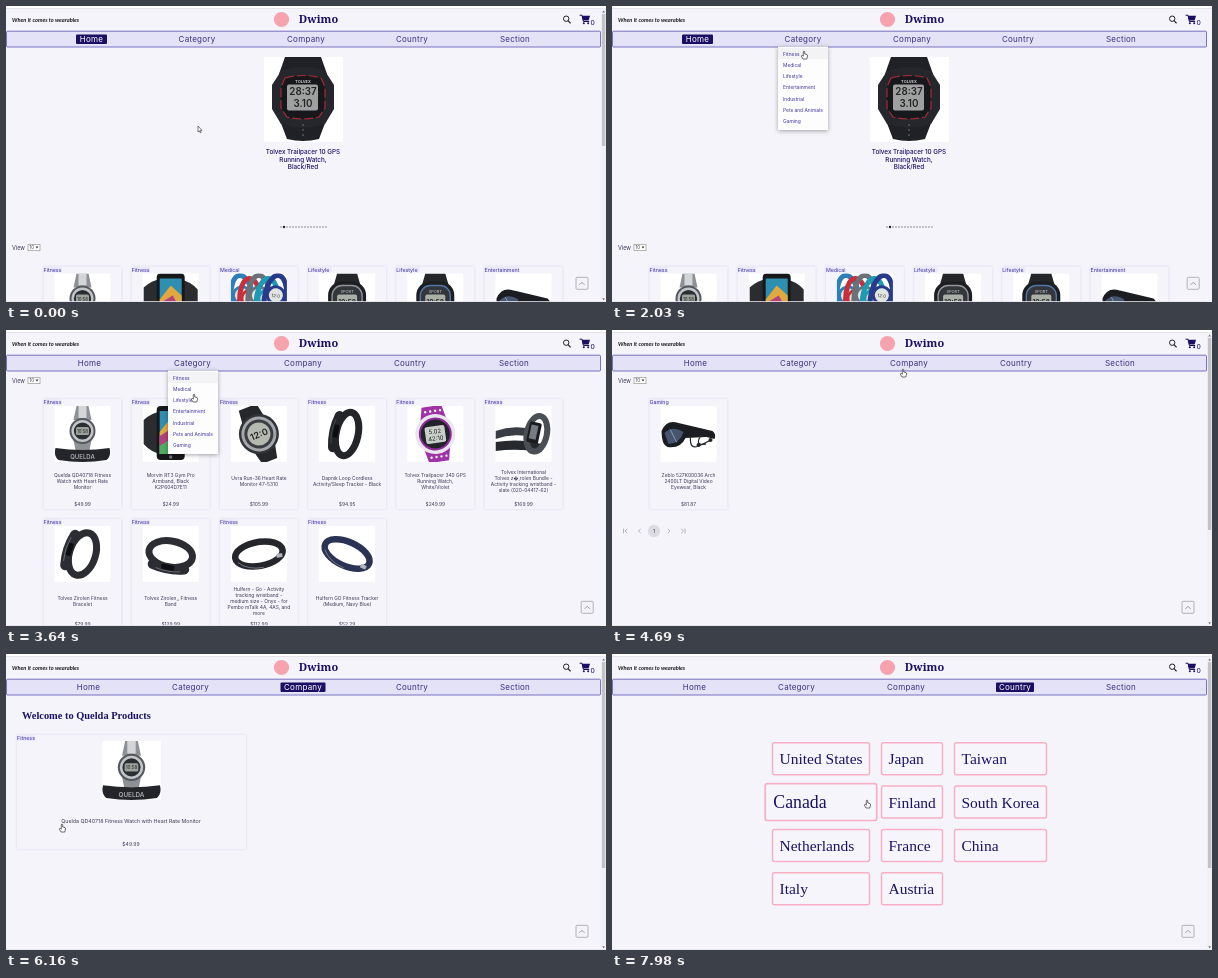
Animation of 600 by 296 pixels, one loop 8 s. Source, as an HTML page:

```html
<!DOCTYPE html>
<html lang="en">
<head>
<meta charset="utf-8">
<title>Wearables shop</title>
<style>
  html, body { margin: 0; width: 100%; height: 100%; overflow: hidden; background: #f5f4fb; }
  svg { display: block; width: 100%; height: 100%; font-family: Inter, "Open Sans", sans-serif; }
  .serif { font-family: "Liberation Serif", "Noto Serif", serif; fill: #1b1266; }
  .card { fill: #f5f4fb; filter: drop-shadow(.9px .9px 1px rgba(70, 60, 150, .17)); }
  .menu { fill: #fdfdfe; filter: drop-shadow(0 1.5px 2px rgba(0, 0, 0, .35)); }
  .mid { text-anchor: middle; }
  .box { transform-box: fill-box; transform-origin: center; }
</style>
</head>
<body>
<svg id="stage" viewBox="0 0 600 296"></svg>
<script>
const LOOP = 8000, STEP = 70;
const NAVY = '#1b0e63', INK = '#3d3a55', LINK = '#4034a6';

const rect = (x, y, w, h, fill, more = '') =>
  `<rect x="${x}" y="${y}" width="${w}" height="${h}" fill="${fill}" ${more}/>`;
const disc = (x, y, r, fill, more = '') =>
  `<circle cx="${x}" cy="${y}" r="${r}" fill="${fill}" ${more}/>`;
const ring = (x, y, rx, ry, color, w) =>
  `<ellipse cx="${x}" cy="${y}" rx="${rx}" ry="${ry}" fill="none" stroke="${color}" stroke-width="${w}"/>`;
const path = (d, fill, more = '') => `<path d="${d}" fill="${fill}" ${more}/>`;
const line = (d, color, w, more = '') =>
  path(d, 'none', `stroke="${color}" stroke-width="${w}" stroke-linecap="round" stroke-linejoin="round" ${more}`);
const text = (x, y, s, size, fill = INK, more = '') =>
  `<text x="${x}" y="${y}" font-size="${size}" fill="${fill}" ${more}>${s}</text>`;
const mid = (x, y, s, size, fill = INK, more = '') => text(x, y, s, size, fill, 'class="mid" ' + more);
const group = (inner, more = '') => `<g ${more}>${inner}</g>`;
const turn = (a, inner) => group(inner, `transform="rotate(${a} 28 28)"`);

// Product pictures, each on a 56 x 56 square
const digital = accent =>
  path('M18 0H38L42 14H14ZM14 42H42L38 56H18Z', '#25262a') +
  rect(9, 8, 38, 40, '#1d1e22', 'rx="14"') + rect(13, 12, 30, 32, '#33363b', `rx="10" stroke="${accent}" stroke-width="1.4"`) +
  mid(28, 19, 'SPORT', 4, '#c9ccd0') + rect(18, 21, 20, 13, '#a9b0a6', 'rx="2"') +
  mid(28, 30.5, '10:58', 6.5, '#24262a', 'font-weight="700"');

// Tall wristband seen at an angle, with a wide front face
const band = (tilt, rx, color, shine) => turn(tilt,
  ring(28, 28, rx, 22, color, 7) + line(`M${28 - rx} 12Q${24 - rx} 28 ${28 - rx} 44`, color, 10) +
  line(`M${25 - rx} 16Q${22 - rx} 28 ${25 - rx} 40`, shine, .8) + rect(25 - rx, 21, 5, 13, '#0d0e11', 'rx="1"'));

const bangle = (tilt, color) => turn(tilt,
  ring(28, 28, 24, 12, color, 6.5) + line('M6 33Q14 42 30 42', '#767b88', .9) + rect(45, 31, 6, 4, '#b0b3bb', 'rx="1"'));

const ART = {
  chest:
    path('M22 0H34L37 14H19ZM19 34H37L35 44H21Z', '#8d9095') + rect(24, 0, 8, 12, '#d3d5d8') +
    disc(28, 25, 13, '#54575c') + disc(28, 25, 11, '#c3c6c9') + disc(28, 25, 8.6, '#2b2e33') +
    rect(21.5, 21, 13, 8, '#9ba29c', 'rx="1.5"') + mid(28, 27, '10:58', 4.4, '#222') +
    path('M1 42Q28 46 55 42Q57 50 52 54Q28 58 4 54Q-1 50 1 42Z', '#24252a') +
    mid(28, 53, 'QUELDA', 6, '#a9abb0', 'font-weight="600"'),
  armband:
    path('M1 14Q10 6 18 6V48Q8 46 1 38ZM38 6Q48 8 55 16V38Q48 46 38 48Z', '#2b2c30') +
    rect(14, 0, 28, 54, '#17181c', 'rx="4"') + rect(17, 5, 22, 43, '#2f8fb0') +
    path('M17 26L28 12L39 22V48H17Z', '#e0a83f') + path('M17 30L30 22L39 38V48H17Z', '#b1427f') +
    path('M17 40L28 33L36 48H17Z', '#4fae62') + disc(28, 51, 1.7, '#777'),
  colours: ['#2c7fb8', '#c92f3b', '#6d7077', '#1d9bb3', '#283a8c'].map((c, i) =>
    group(ring(0, 26, 11, 24, c, 5) + disc(0, 22, 10, c) + disc(0, 22, 7, '#e2e4e0') + mid(0, 24, '12:0', 4.4, '#333'),
      `transform="translate(${8 + i * 10} ${i % 2 * 3}) rotate(${i * 4 - 8})"`)).join(''),
  grey: digital('#91959b'),
  blue: digital('#5076a6'),
  round: turn(-22,
    path('M18 -1H37L40 16H16ZM16 40H40L36 57H20Z', '#25272a') + disc(28, 28, 20, '#303338') +
    disc(28, 28, 17.5, '#a4a8aa') + disc(28, 28, 14.5, '#3b3f44') + disc(28, 28, 11.5, '#b4bab0') +
    mid(28, 31.5, '12:0', 9, '#222', 'font-weight="600"')),
  loop: band(12, 11, '#242529', '#4b4e55'),
  slim: band(18, 13, '#2b2d32', '#73767e'),
  wide: turn(-80, band(0, 13, '#2b2d32', '#73767e')),
  violet: turn(-8,
    path('M18 0H38L41 14H15ZM15 42H41L38 56H18Z', '#a032a7') +
    [21, 26, 31, 36].map(x => disc(x, 5, 1.2, '#fff') + disc(x, 51, 1.2, '#fff')).join('') +
    disc(28, 28, 20, '#e9e6ee') + disc(28, 28, 16.5, '#8e2d98') + disc(28, 28, 14.5, '#22232a') +
    rect(18, 20, 20, 17, '#c8cec8', 'rx="2"') + mid(28, 27.5, '5.02', 6, '#222') + mid(28, 34.5, '42:10', 6, '#222')),
  bundle:
    path('M0 25Q20 18 40 24L42 32Q20 26 0 33Z', '#3a3d43') + path('M0 36Q24 32 46 38V46Q22 42 0 45Z', '#26292e') +
    turn(12, ring(41, 25, 10, 18, '#4a4e55', 6) + rect(32, 14, 12, 21, '#1a1c20', 'rx="2"') + rect(34, 17, 7, 14, '#777c84')),
  onyx: bangle(-10, '#25262b'),
  navy: bangle(24, '#2b3354'),
  eyewear:
    path('M1 25Q6 13 18 17L52 25Q56 28 54 33L46 31L25 32Q20 43 7 41Q1 39 1 25Z', '#1b1d23') +
    path('M4 27Q12 19 23 26Q20 37 8 38Z', '#47546e') + line('M10 24L16 36', '#7f9bb5', 1) +
    line('M30 31Q29 44 38 40T50 34M40 30Q34 40 45 38', '#2c2f36', 1.3) + disc(38, 39, 2, '#23252b') + disc(50, 34, 2, '#23252b')
};

const picture = (x, y, size, name) =>
  rect(x, y, size, size, '#fff') +
  `<svg x="${x}" y="${y}" width="${size}" height="${size}" viewBox="0 0 56 56">${ART[name]}</svg>`;

const tag = (x, y, s) => rect(x, y + .5, s.length * 2.6, 5.4, '#eae8f9') + text(x, y + 5.2, s, 5.3, LINK);

function card(x, y, label, art, title = '', price = '') {
  const lines = title.split('|');
  const top = y + 84.3 - (lines.length - 1) * 3;
  return `<rect class="card" x="${x}" y="${y}" width="78" height="110"/>` + tag(x, y, label) +
    picture(x + 11, y + 7, 56, art) +
    lines.map((s, i) => mid(x + 39, top + i * 6, s, 4.9)).join('') + mid(x + 39, y + 107, price, 4.9);
}
const column = i => 37.5 + i * 88.2;

const viewer = y => text(6, y + 2, 'View', 5.6) + rect(22, y - 3.2, 12, 6.4, '#fff', 'stroke="#888" stroke-width=".6"') +
  text(23.5, y + 1.7, '10', 4.6) + path(`M29.5 ${y - 1}h3l-1.5 2z`, '#333');

const runner =
  rect(258, 51, 79, 85, '#fff') +
  path('M279 51H315L321 68H273ZM273 112H321L313 133Q297 137 281 133Z', '#202126') +
  path('M275 65Q297 57 319 65L328 79V103L319 118Q297 125 275 118L266 103V79Z', '#26272c') +
  path('M279 72Q297 67 315 72L319 81V102L313 111Q297 115 281 111L275 102V81Z', '#17181c',
    'stroke="#a32a38" stroke-width="1.2" stroke-dasharray="9 3"') +
  mid(297, 76.5, 'TOLVEX', 4, '#ddd', 'font-weight="600"') + rect(281, 78.5, 31, 26, '#9fa1a0', 'rx="2"') +
  mid(297, 88.5, '28:37', 9.8, '#222', 'font-weight="600"') + mid(297, 100.5, '3.10', 9.8, '#222', 'font-weight="600"') +
  [0, 1, 2].map(i => disc(297, 119 + i * 5, 1, '#55575d')).join('');

const home = runner +
  ['Tolvex Trailpacer 10 GPS', 'Running Watch,', 'Black/Red'].map((s, i) =>
    mid(297, 148.3 + i * 7.2, s, 6.3, NAVY, 'font-weight="500"')).join('') +
  Array.from({ length: 16 }, (_, i) => disc(275 + i * 3, 221, i === 1 ? 1.2 : .9, i === 1 ? '#222' : '#aaa9b5')).join('') +
  viewer(241.5) +
  ['Fitness chest', 'Fitness armband', 'Medical colours', 'Lifestyle grey', 'Lifestyle blue', 'Entertainment eyewear']
    .map((s, i) => card(column(i), 260.5, ...s.split(' '))).join('');

const goods = [
  ['chest', 'Quelda QD40718 Fitness|Watch with Heart Rate|Monitor', '$49.99'],
  ['armband', 'Morvin RT3 Gym Pro|Armband, Black|K2P604D7E11', '$24.99'],
  ['round', 'Uvra Run-36 Heart Rate|Monitor 47-5310', '$105.99'],
  ['loop', 'Dapnik Loop Cordless|Activity/Sleep Tracker - Black', '$94.95'],
  ['violet', 'Tolvex Trailpacer 340 GPS|Running Watch,|White/Violet', '$249.99'],
  ['bundle', 'Tolvex International|Tolvex z\uFFFD,rolen Bundle -|Activity tracking wristband -|slate (020-04417-62)', '$169.99'],
  ['slim', 'Tolvex Zirolen Fitness|Bracelet', '$79.99'],
  ['wide', 'Tolvex Zirolen,, Fitness|Band', '$129.99'],
  ['onyx', 'Hulfern - Go - Activity|tracking wristband -|medium size - Onyx - for|Pembo mTalk 4A, 4AS, and|more', '$112.99'],
  ['navy', 'Hulfern GO Fitness Tracker|(Medium, Navy Blue)', '$52.29']
];
const fitness = viewer(50.5) +
  goods.map((g, i) => card(column(i % 6), i < 6 ? 69 : 189, 'Fitness', ...g)).join('');

const gaming = viewer(50.5) +
  card(37.5, 69, 'Gaming', 'eyewear', 'Zeblo 527K00036 Arch|2400LT Digital Video|Eyewear, Black', '$81.87') +
  disc(42, 201, 6.2, '#dddce5') + mid(42, 202.9, '1', 5, '#333') +
  line('M11.5 199v4M15 199l-2 2l2 2M28.5 199l-2 2l2 2M56 199l2 2l-2 2M69.5 199l2 2l-2 2M73 199v4', '#a5a4ae', .8);

const product = text(16, 65.3, 'Welcome to Quelda Products', 10.4, '', 'class="serif" font-weight="700"') +
  '<rect class="card" x="11" y="81" width="229" height="114"/>' + tag(11, 81, 'Fitness') + picture(96, 87, 59, 'chest') +
  mid(125, 168.6, 'Quelda QD40718 Fitness Watch with Heart Rate Monitor', 5.3) + mid(125, 192, '$49.99', 5.1);

const cols = [[160, 98], [269, 62], [342, 93]];
const countries = ['United States', 'Japan', 'Taiwan', 'Canada', 'Finland', 'South Korea',
  'Netherlands', 'France', 'China', 'Italy', 'Austria'];
const country = countries.map((name, i) => {
  const [x, w] = cols[i % 3], y = 88.8 + Math.floor(i / 3) * 43.3;
  return group(rect(x + .5, y, w - 1, 32, '#f7f5fc', 'rx="2" stroke="#f7b0c3" stroke-width="1.5"') +
    text(x + 7.5, y + 21.5, name, 15.5, '', 'class="serif"'), 'class="box"');
}).join('');

// start time, content, scroll thumb end, active tab, tab centres
const inner = [83.5, 186.5, 297, 404, 508], brand = [82.5, 184.5, 297, 406, 509];
const scenes = [
  { at: 0, body: home, thumb: 140, active: 0, tabs: [85.5, 191, 300, 406, 509] },
  { at: 2310, body: fitness, thumb: 165, active: -1, tabs: inner },
  { at: 4060, body: gaming, thumb: 200, active: -1, tabs: inner },
  { at: 5250, body: '', thumb: 200, active: 2, tabs: brand },
  { at: 5950, body: product, thumb: 214, active: 2, tabs: brand },
  { at: 7070, body: country, thumb: 214, active: 3, tabs: [82.5, 184.5, 294, 403, 509] }
];
const tabNames = ['Home', 'Category', 'Company', 'Country', 'Section'];
const pillWidth = [31, 40, 45, 38, 40];

const nav = s => tabNames.map((name, i) => {
  const x = s.tabs[i], on = i === s.active;
  return (on ? rect(x - pillWidth[i] / 2, 28.5, pillWidth[i], 9.5, NAVY, 'rx="1"') : '') +
    mid(x, 36.1, name, 8, on ? '#fff' : '#38327f', 'letter-spacing=".25"');
}).join('');

const header =
  rect(0, 0, 600, 2, '#fff') + rect(0, 2, 600, .6, '#d9d8df') +
  text(6, 15.6, 'When it comes to wearables', 5.7, '#18181c', 'font-family="Lato, sans-serif" font-style="italic" font-weight="700"') +
  disc(275.5, 13.5, 7.6, '#f6a3ad') +
  mid(312.5, 17.3, 'Dwimo', 11, NAVY, 'font-family="Noto Serif, serif" font-weight="900"') +
  disc(560.2, 12.7, 2.7, 'none', 'stroke="#222" stroke-width="1"') + line('M562.2 14.8L564.3 17', '#222', 1.1) +
  line('M574 9.2h2l1.4 6.3h5.4', NAVY, 1) + path('M575.8 9.8H584L582.6 14.4H577Z', NAVY) +
  disc(577.8, 17.3, 1, NAVY) + disc(582.2, 17.3, 1, NAVY) + text(584.6, 19, '0', 6.8, NAVY) +
  rect(.5, 25.2, 594, 15.8, '#e3e2f7', 'rx="1" stroke="#5a53b0" stroke-width=".8"');

const toTop = rect(570, 271.3, 12, 12, '#f3f2f8', 'rx="1" stroke="#a3a2ac" stroke-width=".8"') +
  line('M573.7 278.6l2.3-2.3l2.3 2.3', '#888793', .8);
const scrollbar = thumb =>
  group(rect(595, 2.6, 5, 293.4, '#f1f1f3') + path('M596.2 6.5h2.8l-1.4-2zM596.2 292.3h2.8l-1.4 2z', '#77777c') +
    rect(595.9, 8, 3.4, thumb - 8, '#c3c3c7'), 'class="bar"');

const menuItems = ['Fitness', 'Medical', 'Lifestyle', 'Entertainment', 'Industrial', 'Pets and Animals', 'Gaming'];
const menu = '<rect class="menu" x="0" y="40.5" width="50" height="83.5"/>' +
  rect(0, 42, 50, 11.3, '#f3f3f5') +
  menuItems.map((s, i) => text(5, 49.5 + i * 11.27, s, 4.9, LINK)).join('');

const pointer = path('M0 0V6L1.4 4.8L2.3 6.8L3.2 6.4L2.3 4.4H4Z', '#fff', 'stroke="#222" stroke-width=".6"');
const hand = path('M-.7 .5Q0-.5 .7 .5V3L3 3.5Q3.7 3.8 3.5 5L2.8 8H-1L-2.6 5.3Q-2.6 4.2-1.6 4.5L-.7 5.2Z', '#fff', 'stroke="#222" stroke-width=".65"');

const stage = document.getElementById('stage');
stage.innerHTML = rect(0, 0, 600, 296, '#f5f4fb') + header +
  scenes.map(s => group(nav(s) + s.body + scrollbar(s.thumb), 'class="scene"')).join('') +
  rect(0, 295.2, 595, .8, '#e6e5ec') + group(toTop, 'id="top"') +
  group(menu, 'id="menu"') + group(pointer, 'id="pointer"') + group(hand, 'id="hand"');

const get = id => document.getElementById(id);
const all = name => [...stage.querySelectorAll(name)];
const pages = all('.scene'), boxes = all('.box'), bars = all('.bar');
const show = (el, on) => { el.style.display = on ? '' : 'none'; };
const move = (id, x, y) => get(id).setAttribute('transform', `translate(${x} ${y})`);
const within = (t, spans) => spans.some(([a, b]) => t >= a && t < b);
const clamp = v => Math.max(0, Math.min(1, v));
const smooth = v => v * v * (3 - 2 * v);

// time, x, y of the cursor tip
const route = [
  [0, 192, 120], [840, 192, 120], [1330, 191, 33], [1750, 191, 33], [1960, 192, 45], [2450, 192, 45],
  [3010, 186, 33], [3430, 186, 33], [3640, 188, 64], [3920, 184, 111], [4130, 184, 111],
  [4620, 291, 39], [5250, 291, 39], [5740, 56, 170], [6230, 56, 170], [6720, 330, 66], [6930, 401, 35],
  [7420, 401, 35], [7560, 405, 58], [7840, 255, 146], [LOOP, 255, 146]
];
const arrowSpans = [[0, 1260], [4200, 4550], [5320, 5810], [6300, 6860], [7490, 7650]];
const menuSpans = [[1400, 2310], [3430, 4060]];
// box index, hover start, hover end
const hovers = [[1, 7650, 7740], [3, 7740, LOOP]];

function cursorAt(t) {
  const i = route.findIndex(p => p[0] > t);
  const [t0, x0, y0] = route[i - 1], [t1, x1, y1] = route[i];
  const k = smooth((t - t0) / (t1 - t0));
  return [x0 + (x1 - x0) * k, y0 + (y1 - y0) * k];
}

function draw(t) {
  const current = scenes.findLastIndex(s => s.at <= t);
  pages.forEach((p, i) => show(p, i === current));

  const [x, y] = cursorAt(t);
  const isArrow = within(t, arrowSpans);
  show(get('pointer'), isArrow);
  show(get('hand'), !isArrow);
  move(isArrow ? 'pointer' : 'hand', x, y);

  // An open menu locks scrolling, so the bar gives way
  const open = within(t, menuSpans);
  show(get('menu'), open);
  move('menu', current ? 162 : 166, 0);
  bars.forEach(b => show(b, !open));
  move('top', open ? 5.2 : 0, 0);

  for (const [i, from, to] of hovers) {
    const grow = smooth(clamp((t - from) / 160)) - smooth(clamp((t - to) / 160));
    boxes[i].style.transform = `scale(${1 + .15 * Math.max(0, grow)})`;
  }
}

function tick() {
  const t = performance.now() % LOOP;
  draw(Math.floor(t / STEP) * STEP);
  requestAnimationFrame(tick);
}
tick();
</script>
</body>
</html>
```
